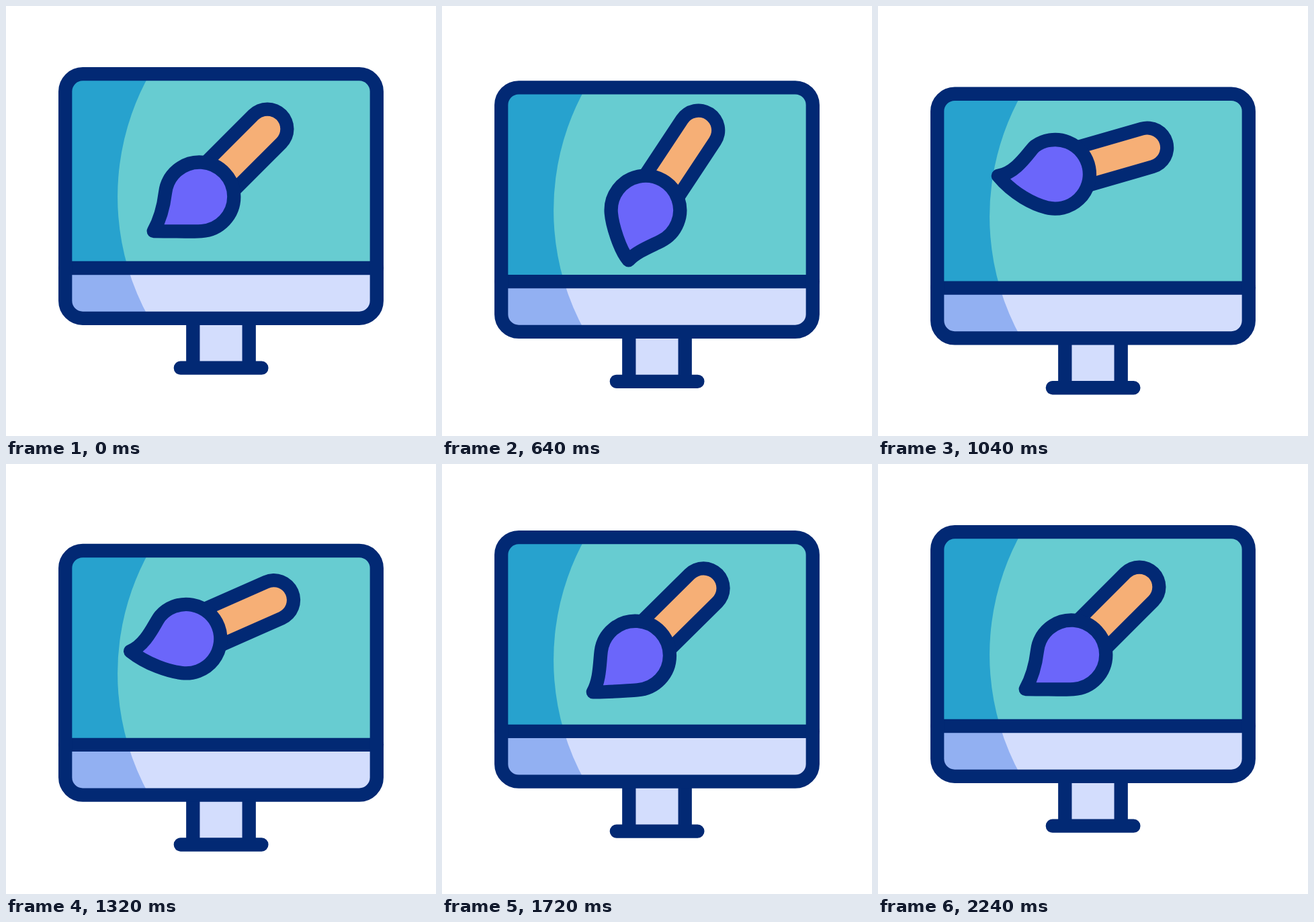
Write an HTML page that moves like this. It is 640 px wide and 640 px high and loops after 2.32 s.

```html
<!DOCTYPE html>
<html lang="en">
<head>
<meta charset="utf-8">
<title>Design monitor</title>
<style>
  html, body { margin: 0; width: 100%; height: 100%; overflow: hidden; background: #fff; }
  svg { display: block; width: 100vw; height: 100vh; }
  .line { fill: none; stroke: #022974; stroke-width: 20.3; stroke-linecap: round; stroke-linejoin: round; }
</style>
</head>
<body>
<svg viewBox="0 0 640 640">
  <defs>
    <clipPath id="case"><rect x="88.2" y="101.2" width="463.6" height="363.6" rx="26"/></clipPath>
  </defs>

  <g id="monitor">
    <path d="M278.3 465V538.7H361.7V465Z" fill="#d3ddfd"/>
    <path class="line" d="M278.3 465V538.7M361.7 465V538.7M259.8 538.7H380.4"/>
    <g clip-path="url(#case)">
      <path d="M80 90H560V390H80Z" fill="#27a2ce"/>
      <path d="M80 390H560V470H80Z" fill="#92b0f2"/>
      <path d="M560 90H220.5A373 373 0 0 0 181.5 390H560Z" fill="#67ccd1"/>
      <path d="M560 390H181.5A373 373 0 0 0 216 470H560Z" fill="#d3ddfd"/>
    </g>
    <path class="line" d="M88.2 390H552"/>
    <rect class="line" x="88.2" y="101.2" width="463.6" height="363.6" rx="26"/>
  </g>

  <g id="brush">
    <g fill="none" stroke-linecap="round">
      <path d="M288 284L389 183" stroke="#022974" stroke-width="79"/>
      <path d="M288 284L389 183" stroke="#f6af76" stroke-width="38.6"/>
    </g>
    <path id="bristle" class="line" transform="translate(288 283.8)" style="fill:#6b66fa"/>
  </g>
</svg>

<script>
const LOOP = 2320, STEP = 40, R = 51.3;
const PIVOT = [356.2, 215.8];
const monitor = document.getElementById('monitor');
const brush = document.getElementById('brush');
const bristle = document.getElementById('bristle');

// Each key: time, value, and optionally the easing handles leading into it.
const tracks = {
  screenY: [[120, 0], [1120, 29.7, .447, .369], [2160, 0, .5, .39]],
  brushY: [[200, 0], [760, 9], [2080, 0]],
  turn: [[120, 0], [520, 17], [1080, -29.6], [1760, 0]],
  bend: [[120, 0], [640, 32], [1040, -9], [1880, 8], [2200, 0]],
  curl: [[120, 0], [640, 1], [1040, -1.3], [1880, .1], [2200, 0]]
};

function ease(x, a, b) {
  let lo = 0, hi = 1, u = x;
  for (let i = 0; i < 24; i++) {
    u = (lo + hi) / 2;
    const at = 3 * a * u * (1 - u) ** 2 + 3 * b * u * u * (1 - u) + u ** 3;
    if (at < x) lo = u; else hi = u;
  }
  return u * u * (3 - 2 * u);
}

function valueAt(keys, t) {
  if (t <= keys[0][0]) return keys[0][1];
  for (let i = 1; i < keys.length; i++) {
    const [t0, v0] = keys[i - 1];
    const [t1, v1, a = 1 / 3, b = 2 / 3] = keys[i];
    if (t < t1) return v0 + (v1 - v0) * ease((t - t0) / (t1 - t0), a, b);
  }
  return keys[keys.length - 1][1];
}

// Round bulb with a soft tip that swings sideways and curls.
function bristlePath(bend, curl) {
  const pos = Math.max(curl, 0), neg = Math.min(curl, 0);
  const shrink = Math.abs(bend) * .27;
  const tip = [-68.3 + (bend + shrink) * .707, R + (bend - shrink) * .707];

  const low = Math.asin(.06 + .2 * Math.min(Math.abs(curl), 1));
  const b = [R * Math.sin(low), R * Math.cos(low)];
  const b1 = [b[0] - 20 * Math.cos(low), b[1] + 20 * Math.sin(low)];
  const b2 = [tip[0] + 23 - 8 * curl, tip[1] - 10 * curl];

  const side = .12 - .25 * neg, reach = 17 + 6 * neg;
  const s = [-R * Math.cos(side), -R * Math.sin(side)];
  const s1 = [tip[0] + 10 - 20 * pos - 10 * neg, tip[1] - 18];
  const s2 = [s[0] - reach * Math.sin(side), s[1] + reach * Math.cos(side)];

  return `M${s}A${R} ${R} 0 1 1 ${b}C${b1} ${b2} ${tip}C${s1} ${s2} ${s}Z`;
}

function draw(now) {
  const t = Math.floor((now % LOOP) / STEP) * STEP;
  const at = name => valueAt(tracks[name], t);
  monitor.setAttribute('transform', `translate(0 ${at('screenY')})`);
  brush.setAttribute('transform', `translate(0 ${at('brushY')}) rotate(${-at('turn')} ${PIVOT})`);
  bristle.setAttribute('d', bristlePath(at('bend'), at('curl')));
}

function tick() {
  draw(performance.now());
  requestAnimationFrame(tick);
}
tick();
</script>
</body>
</html>
```
